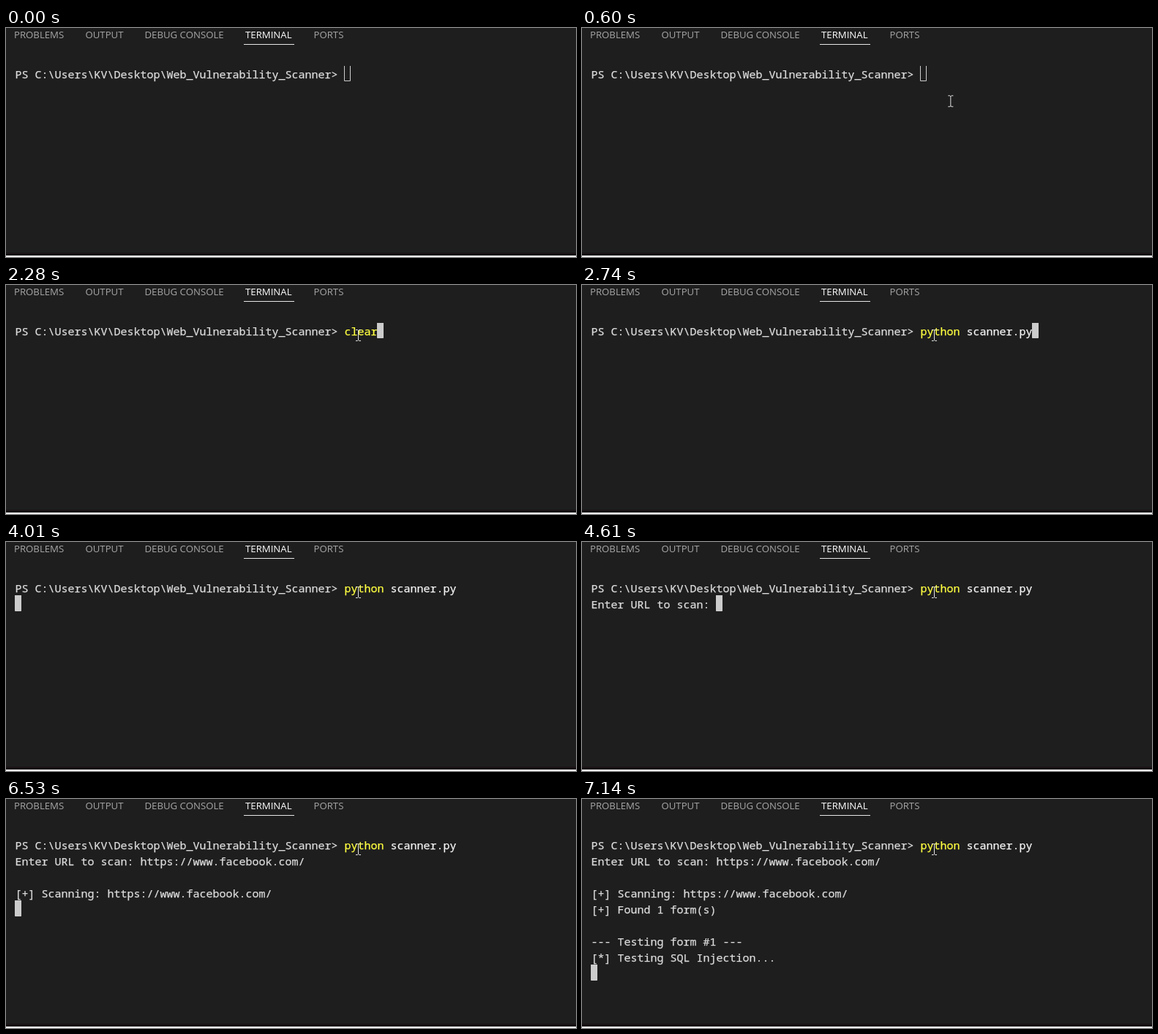
Write an HTML page that moves like this. It is 779 px wide and 314 px high and loops after 8 s.

```html
<!DOCTYPE html>
<html lang="en">
<head>
<meta charset="utf-8">
<title>Terminal scan</title>
<style>
  html, body { margin: 0; width: 100%; height: 100%; overflow: hidden; background: #1e1e1e; }
  svg { display: block; }
  .tab { font: 13.2px "Open Sans", "Noto Sans", sans-serif; fill: #a6a6a6; }
  .active { fill: #ffffff; }
  .line {
    font: 15px "Noto Sans Mono", "DejaVu Sans Mono", monospace; white-space: pre;
    fill: #dcdcdc; stroke: #dcdcdc; stroke-width: 0.25;
  }
  .command { fill: #ffff40; stroke: #ffff40; }
  .args { fill: #f4f4f4; stroke: #f4f4f4; }
</style>
</head>
<body>
<svg id="stage" width="779" height="314" viewBox="0 0 779 314">
  <rect width="779" height="314" fill="#1e1e1e"/>
  <rect y="308" width="779" height="4" fill="#181216"/>
  <g id="tabs"></g>
  <rect x="325" y="22" width="69" height="1" fill="#e7e7e7"/>
  <path id="block" stroke="#cccccc"/>
  <g id="lines"></g>
  <path id="mouse" d="M-3.5-7.5h2.5l1 1 1-1h2.5M0-7V7M-3.5 7.5h2.5l1-1 1 1h2.5" fill="none" stroke="#e4e4e4"/>
  <rect y="312" width="779" height="2" fill="#ffffff"/>
</svg>
<script>
const LOOP = 8000, CELL = 9, LEFT = 12, ROW = 22;
const PROMPT = "PS C:\\Users\\KV\\Desktop\\Web_Vulnerability_Scanner> ";
const ASK = "Enter URL to scan: ";
const URL_TEXT = "https://www.facebook.com/";
const byId = id => document.getElementById(id);
const block = byId("block"), mouse = byId("mouse");

function add(parent, tag, attrs, text) {
  const el = document.createElementNS("http://www.w3.org/2000/svg", tag);
  set(el, attrs);
  if (text) el.textContent = text;
  return parent.appendChild(el);
}
function set(el, attrs) {
  for (const key in attrs) el.setAttribute(key, attrs[key]);
}

[["PROBLEMS", 11], ["OUTPUT", 108.5], ["DEBUG CONSOLE", 189.5], ["TERMINAL", 327], ["PORTS", 420.5]]
  .forEach(([name, x]) =>
    add(byId("tabs"), "text", { x, y: 14, class: name === "TERMINAL" ? "tab active" : "tab" }, name));

// Each piece of terminal text: row, column, content, start, end, class
const pieces = [
  [0, 0, PROMPT, 0, LOOP, ""],
  [0, 50, "clear", 2280, 2740, "command"],
  [0, 50, "python", 2740, LOOP, "command"],
  [0, 57, "scanner.py", 2740, LOOP, "args"],
  [1, 0, ASK, 4610, LOOP, ""],
  [1, 19, URL_TEXT, 5620, LOOP, ""],
  [3, 0, "[+] Scanning: " + URL_TEXT, 6530, LOOP, ""],
  [4, 0, "[+] Found 1 form(s)", 7060, LOOP, ""],
  [6, 0, "--- Testing form #1 ---", 7140, LOOP, ""],
  [7, 0, "[*] Testing SQL Injection...", 7140, LOOP, ""]
].map(([row, col, text, from, to, style]) => ({
  from, to,
  el: add(byId("lines"), "text", {
    x: LEFT + 0.4 + col * CELL, y: 69 + row * ROW, class: "line " + style
  }, text)
}));

// Terminal cursor: time, row, column
const stops = [
  [0, 0, 50], [2280, 0, 55], [2740, 0, 67], [4010, 1, 0], [4610, 1, 19],
  [5620, 1, 44], [6530, 4, 0], [7060, 5, 0], [7140, 8, 0]
];

// Mouse path: step, x, y
const path = [[0, 721, 304], [7, 455, 54.5], [9, 506.5, 86], [12, 481.5, 69]];

function mouseAt(step) {
  let i = 0;
  while (i < path.length - 2 && step >= path[i + 1][0]) i++;
  const [s0, x0, y0] = path[i], [s1, x1, y1] = path[i + 1];
  const u = Math.min(1, (step - s0) / (s1 - s0));
  const k = 1 - (1 - u) ** 2;
  return [x0 + (x1 - x0) * k, y0 + (y1 - y0) * k];
}

// The unfocused cursor is an outline open at the top
function drawBlock(t) {
  const [, row, col] = stops.filter(s => s[0] <= t).pop();
  const x = LEFT + col * CELL + 0.5, top = Math.max(52, 51 + row * ROW);
  const bottom = 72.5 + row * ROW;
  const focused = t >= 1360;
  set(block, {
    d: `M${x} ${top}V${bottom}h${CELL - 1}V${top}`,
    fill: focused ? "#cccccc" : "none"
  });
}

function render(t) {
  for (const p of pieces) p.el.style.display = t >= p.from && t < p.to ? "" : "none";
  drawBlock(t);
  const step = Math.floor((t - 320) / 70);
  mouse.style.display = step < 0 ? "none" : "";
  if (step >= 0) set(mouse, { transform: `translate(${mouseAt(step)})` });
}

const start = performance.now();
function tick() {
  render((performance.now() - start) % LOOP);
  requestAnimationFrame(tick);
}
tick();
</script>
</body>
</html>
```
